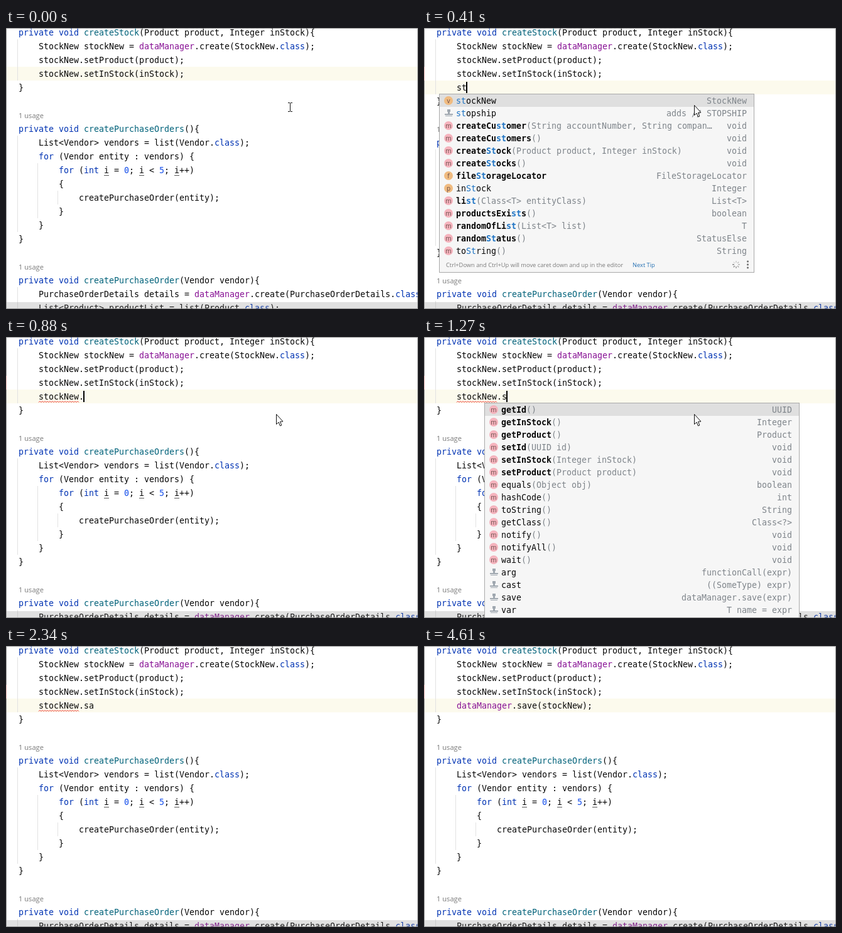
These frames come from a looping animation (656 px wide and 449 px high, 4.68 s). An HTML page with a canvas:

```html
<!DOCTYPE html>
<html>
<head>
<meta charset="utf-8">
<style>
html, body { margin: 0; width: 100%; height: 100%; overflow: hidden; background: #fff; }
canvas { display: block; }
</style>
</head>
<body>
<canvas id="stage" width="656" height="449"></canvas>
<script>
const ctx = document.getElementById('stage').getContext('2d');
const LOOP = 4680, CELL = 8, LINE = 22;
const MONO = '13.29px "DejaVu Sans Mono", monospace';
const UI = '"Open Sans", "Noto Sans", sans-serif';
const INK = '#080808', GREY = '#7f858b', BLUE = '#0033b3', MATCH = '#1f74c4';

const HEAD = [
  'private void createStock(Product product, Integer inStock){',
  '    StockNew stockNew = dataManager.create(StockNew.class);',
  '    stockNew.setProduct(product);',
  '    stockNew.setInStock(inStock);'
];
const TAIL = [
  '}', '', '#1 usage',
  'private void createPurchaseOrders(){',
  '    List<Vendor> vendors = list(Vendor.class);',
  '    for (Vendor entity : vendors) {',
  '        for (int i = 0; i < 5; i++)',
  '        {',
  '            createPurchaseOrder(entity);',
  '        }',
  '    }',
  '}', '', '#1 usage',
  'private void createPurchaseOrder(Vendor vendor){',
  '    PurchaseOrderDetails details = dataManager.create(PurchaseOrderDetails.class);',
  '    List<Product> productList = list(Product.class);'
];

// Rows: icon | name (* = bold) | parameters | type
const NAMES = [
  'v|stockNew||StockNew', 't|stopship||adds // STOPSHIP',
  'm|*createCustomer|(String accountNumber, String compan…|void',
  'm|*createCustomers|()|void',
  'm|*createStock|(Product product, Integer inStock)|void',
  'm|*createStocks|()|void',
  'f|*fileStorageLocator||FileStorageLocator',
  'p|inStock||Integer', 'm|*list|(Class<T> entityClass)|List<T>',
  'm|*productsExists|()|boolean', 'm|*randomOfList|(List<T> list)|T',
  'm|*randomStatus|()|StatusElse', 'm|toString|()|String'
];
const MEMBERS = [
  'm|*getId|()|UUID', 'm|*getInStock|()|Integer', 'm|*getProduct|()|Product',
  'm|*setId|(UUID id)|void', 'm|*setInStock|(Integer inStock)|void',
  'm|*setProduct|(Product product)|void', 'm|equals|(Object obj)|boolean',
  'm|hashCode|()|int', 'm|toString|()|String', 'm|getClass|()|Class<?>',
  'm|notify|()|void', 'm|notifyAll|()|void', 'm|wait|()|void',
  't|arg||functionCall(expr)', 't|cast||((SomeType) expr)',
  't|save||dataManager.save(expr)', 't|var||T name = expr', 't|return||return expr'
];
const SAVE = ['t|save||dataManager.save(expr)'];
const ENTER_TIP = 'Press Enter to insert, Tab to replace';
const MOVE_TIP = 'Ctrl+Down and Ctrl+Up will move caret down and up in the editor';

const TYPED = [
  [70, ''], [140, 's'], [280, 'st'], [610, 'stockNew'], [880, 'stockNew.'],
  [1270, 'stockNew.s'], [1410, 'stockNew.sa'],
  [2410, 'dataManager.save(stockNew)'], [3490, 'dataManager.save(stockNew);']
];

const between = (t, a, b) => t >= a && t < b;

function rect(x, y, w, h, color) {
  ctx.fillStyle = color;
  ctx.fillRect(x, y, w, h);
}

function text(s, x, y, color, font = MONO) {
  ctx.font = font;
  ctx.fillStyle = color;
  ctx.fillText(s, x, y);
}

function path(points, color, width = 1) {
  ctx.beginPath();
  points.forEach(p => ctx.lineTo(...p));
  ctx.strokeStyle = color;
  ctx.lineWidth = width;
  ctx.stroke();
}

function dot(x, y, r, color) {
  ctx.beginPath();
  ctx.arc(x, y, r, 0, 7);
  ctx.fillStyle = color;
  ctx.fill();
}

function tokenColor(word, before, plain) {
  if (/^(private|void|for|int|class)$/.test(word)) return BLUE;
  if (/void $/.test(before)) return '#00627a';
  if (word === 'dataManager' && !plain) return '#871094';
  return /^\d/.test(word) ? '#1750eb' : INK;
}

function codeLine(line, row, plain) {
  const y = 12 + row * LINE;
  if (line[0] === '#') return text(line.slice(1), 20, y, '#7a7a7a', '11.15px ' + UI);
  for (const m of line.matchAll(/\w+|[^\w\s]+/g)) {
    const x = 20 + m.index * CELL;
    text(m[0], x, y, tokenColor(m[0], line.slice(0, m.index), plain));
    if (m[0] === 'i') rect(x, y + 3, CELL, 1, '#555');
  }
}

function guide(col, from, to) {
  rect(18 + col * CELL, from * LINE - 4, 1, (to - from) * LINE, '#e2e2e2');
}

function squiggle(x, end) {
  const points = [];
  for (let i = 0; x + i <= end; i += 2) points.push([x + i, i % 4 ? 102.5 : 104.5]);
  path(points, '#f03a30');
}

function stamp(x, y) {
  rect(x - 2, y - 6, 5, 4, '#a0a8b0');
  rect(x - 1, y - 2, 3, 3, '#a0a8b0');
  rect(x - 6, y + 1, 13, 2, '#a0a8b0');
  rect(x - 5, y + 4, 11, 1, '#a0a8b0');
}

function popup(x, w, rows, match, tip, t) {
  const h = rows.length * 20 + 25, end = x + w - 12, foot = 105 + h - 12;
  rect(x, 105, w, h + 1, '#a9a9a9');
  rect(x + 1, 106, w - 2, h - 1, '#f6f6f6');
  rect(x + 1, 106, w - 2, 20, '#dfdfdf');
  rows.forEach((row, i) => {
    const [icon, label, params, type] = row.split('|');
    const y = 116 + i * 20, left = x + 27;
    const bold = label[0] === '*', name = label.replace('*', '');
    const font = (bold ? 'bold ' : '') + MONO;
    if (icon === 't') stamp(x + 15, y);
    else {
      dot(x + 15, y, 7, icon === 'm' ? '#f5b3bd' : '#f0bb80');
      ctx.textAlign = 'center';
      text(icon, x + 15, y + 3.5, '#694b48', '10px ' + UI);
      ctx.textAlign = 'left';
    }
    const at = match ? name.toLowerCase().indexOf(match) : -1;
    [...name].forEach((c, n) => {
      const hit = at >= 0 && n >= at && n < at + match.length;
      text(c, left + n * CELL, y + 5, hit ? MATCH : INK, font);
    });
    text(params, left + name.length * CELL, y + 5, GREY);
    text(type, end - type.length * CELL, y + 5, GREY);
  });
  const small = '9.3px ' + UI;
  const tipEnd = tip === MOVE_TIP ? 308 : 169;
  text(tip, x + 11, foot + 4, '#7b7b7b', small);
  text('Next Tip', x + tipEnd, foot + 4, '#2470b3', small);
  for (const d of [-5, 0, 5]) dot(x + w - 10.5, foot + d, 1.5, '#6e6e6e');
  if (tip === MOVE_TIP) spinner(x + w - 29, foot, t);
}

function spinner(x, y, t) {
  const step = Math.floor(t / 70);
  for (let i = 0; i < 8; i++) {
    const a = i * Math.PI / 4, c = Math.cos(a), s = Math.sin(a);
    const alpha = 0.2 + ((i - step) & 7) / 12;
    path([[x + 3 * c, y + 3 * s], [x + 6 * c, y + 6 * s]], `rgba(90,90,90,${alpha})`, 1.4);
  }
}

function iBeam(x, y) {
  rect(x, y - 6, 1, 13, '#111');
  for (const d of [-7, 7]) {
    rect(x - 3, y + d, 3, 1, '#111');
    rect(x + 1, y + d, 3, 1, '#111');
  }
}

function arrow(x, y) {
  ctx.beginPath();
  [[0, 0], [0, 16], [3.6, 12.6], [6, 18.5], [8.3, 17.5], [6, 11.8], [10.5, 11.5]]
    .forEach(([a, b]) => ctx.lineTo(x + a, y + b));
  ctx.closePath();
  ctx.fillStyle = '#fff';
  ctx.fill();
  ctx.strokeStyle = '#111';
  ctx.lineWidth = 1;
  ctx.stroke();
}

function mouse(t) {
  if (t < 340) {
    const k = Math.max(0, (t - 70) / 270);
    iBeam(Math.round(452 - 20 * k), Math.round(126 - 2 * k));
  } else if (t < 2140) arrow(430.5, 123.5);
  else if (between(t, 2410, 3490)) iBeam(432, 124);
}

function bulb() {
  dot(2, 90, 5, '#dc5560');
  rect(2, 87, 1, 4, '#fff');
  rect(2, 92, 1, 1, '#fff');
  rect(1, 96, 4, 1, '#777');
  rect(1, 98, 4, 1, '#777');
}

function typedLine(t, typed) {
  const end = 52 + typed.length * CELL;
  if (between(t, 740, 880)) {
    rect(124, 18, 64, LINE, '#fce8f4');
    for (const y of [40, 62, 84]) rect(52, y, 64, LINE, '#edebfc');
  }
  if (between(t, 2410, 3490))
    for (const x of [180, 252]) rect(x, 84, CELL, LINE, '#93d9d9');
  codeLine('    ' + typed, 4, t < 2700);
  if (between(t, 740, 2410)) squiggle(52, 116);
  if (between(t, 2760, 3490)) squiggle(260, 267);
  if (between(t, 3490, 3900)) squiggle(268, 275);
  if (!between(t, 2010, 2410) && t < 4610) rect(end - 1, 86, 2, 18, '#000');
  if (between(t, 3290, 3490)) bulb();
}

function draw(t) {
  const added = t >= 70 ? 1 : 0, row = 3 + added;
  rect(0, 0, 656, 449, '#fff');
  rect(0, row * LINE - 4, 656, LINE, '#fcfaed');
  guide(0, 1, 4 + added);
  guide(0, 8 + added, 15 + added);
  guide(4, 10 + added, 14 + added);
  guide(8, 12 + added, 13 + added);
  guide(0, 19 + added, 22);
  if (added) typedLine(t, TYPED.filter(e => e[0] <= t).pop()[1]);
  HEAD.forEach((s, i) => codeLine(s, i));
  TAIL.forEach((s, i) => codeLine(s, i + 4 + added));
  rect(0, 438, 656, 10, 'rgba(120,120,120,.22)');

  if (between(t, 340, 610)) popup(24, 502, NAMES, 'st', MOVE_TIP, t);
  if (between(t, 960, 1340)) popup(96, 502, MEMBERS, '', ENTER_TIP, t);
  if (between(t, 1340, 1480))
    popup(96, 502, MEMBERS.filter(r => /\|\*?s/.test(r)), 's', ENTER_TIP, t);
  if (between(t, 1480, 2340)) popup(96, 502, SAVE, '', ENTER_TIP, t);
  mouse(t);

  ctx.strokeStyle = '#909090';
  ctx.lineWidth = 1;
  ctx.strokeRect(0.5, 0.5, 655, 448);
  if (added) rect(0, 62, 1, 22, '#d8a8a4');
}

function frame() {
  draw(performance.now() % LOOP);
  requestAnimationFrame(frame);
}
frame();
</script>
</body>
</html>
```
